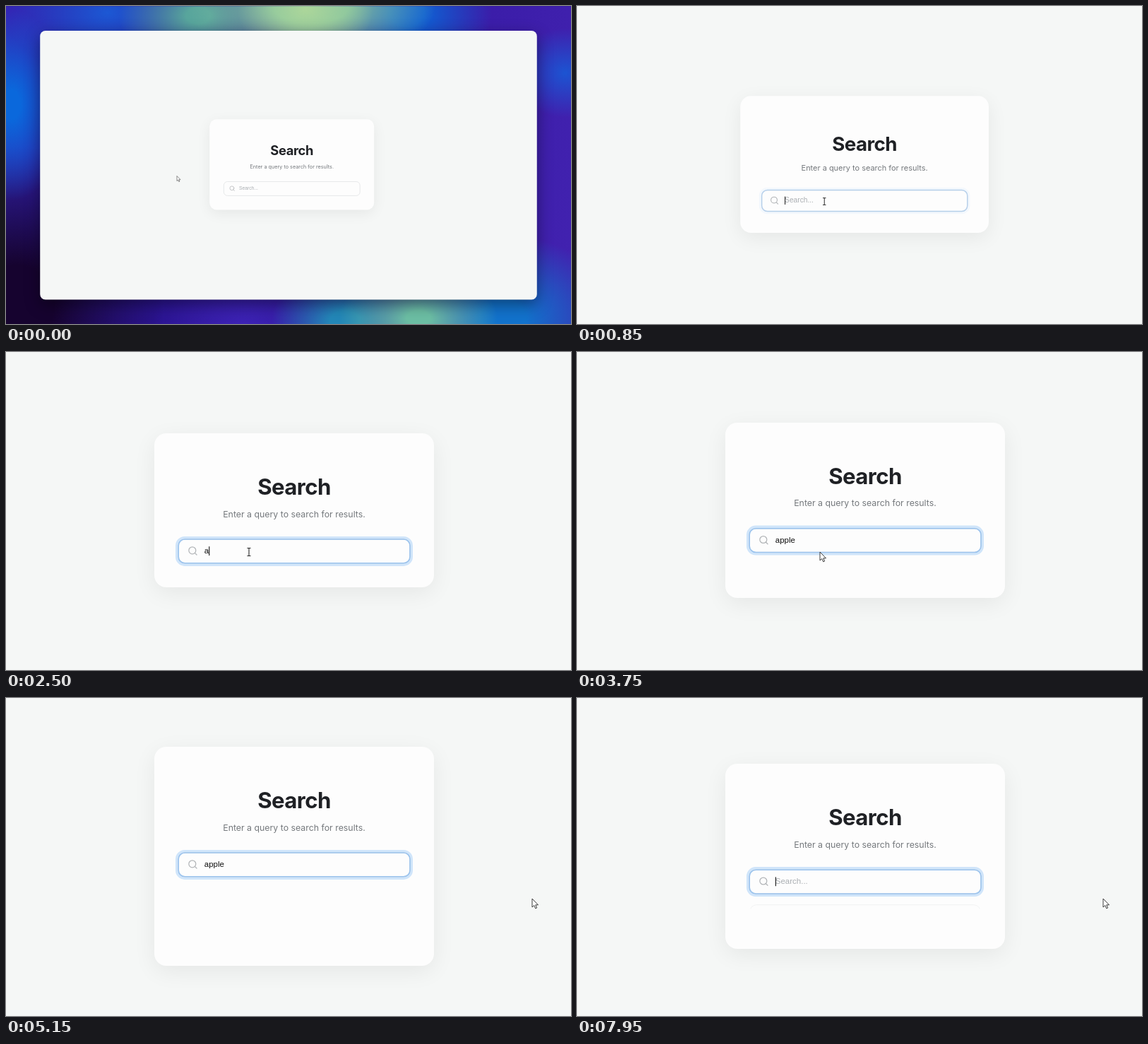
Animation of 800 by 450 pixels, one loop 8000 ms. Source, as an HTML page:

```html
<!DOCTYPE html>
<html lang="en">
<head>
<meta charset="utf-8">
<title>Search card</title>
<style>
  html, body { margin: 0; width: 100%; height: 100%; overflow: hidden; background: #2a1390; }
  #stage { position: relative; width: 800px; height: 450px; overflow: hidden; }
  #scene { position: absolute; inset: 0; transform-origin: 400px 225px; }
  #scene > * { position: absolute; }
  #wall {
    left: -280px; top: -157.5px; width: 1360px; height: 765px;
    background:
      radial-gradient(12% 16% at 53% 1%, #acd69a, transparent),
      radial-gradient(22% 18% at 54% 0%, #7fc0a0 30%, transparent),
      radial-gradient(14% 17% at 34% 3%, #58a59c 15%, transparent),
      radial-gradient(15% 22% at 71% 2%, #0f60d4 20%, transparent),
      radial-gradient(18% 20% at 18% 2%, #1c58d4, transparent),
      radial-gradient(10% 30% at 1% 31%, #0a68dc 15%, transparent),
      radial-gradient(9% 14% at 99% 21%, #1c54d2, transparent),
      radial-gradient(14% 15% at 73% 98%, #6cbea4 15%, transparent),
      radial-gradient(13% 16% at 60% 99%, #2387b8 20%, transparent),
      radial-gradient(20% 26% at 88% 98%, #1272cc 20%, transparent),
      radial-gradient(26% 50% at 2% 94%, #16032f 25%, transparent),
      radial-gradient(16% 22% at 42% 100%, #3c22b4, transparent),
      linear-gradient(100deg, #3424b4, #2a1390 35%, #3a1ca8 75%, #4222b0);
  }
  #window {
    left: -198.4px; top: -98px; width: 1196.8px; height: 647px;
    border-radius: 13px; background: #f5f7f6;
    box-shadow: 0 12px 36px rgba(0, 0, 0, .4);
  }
  #card {
    left: 209.5px; width: 396.5px; border-radius: 17px; background: #fdfdfd;
    box-shadow: 0 8px 32px rgba(0, 0, 0, .065);
  }
  svg { left: 0; top: 0; overflow: visible; }
  .title { font: 700 31.2px Inter, sans-serif; letter-spacing: -.02em; fill: #1f2125; }
  .sub { font: 400 12.34px Inter, sans-serif; fill: #75797d; }
  .field { font: 400 11.5px "Liberation Sans", Arial, sans-serif; white-space: pre; }
</style>
</head>
<body>
<div id="stage">
  <div id="scene">
    <div id="wall"></div>
    <div id="window"></div>
    <div id="card"></div>
    <svg width="800" height="450" fill="none">
      <defs>
        <clipPath id="clip"><rect id="reveal" x="240" y="313" width="336" height="0"/></clipPath>
      </defs>
      <g id="content">
        <text class="title" x="408" y="202" text-anchor="middle">Search</text>
        <text class="sub" x="408" y="233.8" text-anchor="middle">Enter a query to search for results.</text>
        <rect id="ring" x="242" y="262.9" width="332" height="38" rx="11" stroke="#d0e5fa" stroke-width="4"/>
        <rect x="244.2" y="265" width="327.8" height="33.8" rx="9" fill="#fdfdfd" stroke="#e2e4e6" stroke-width="1.4"/>
        <rect id="focus" x="244.2" y="265" width="327.8" height="33.8" rx="9" stroke="#9ac3ee" stroke-width="1.6"/>
        <g transform="translate(257 274) scale(.62)" stroke="#b1b4b7" stroke-width="2" stroke-linecap="round">
          <circle cx="11" cy="11" r="8"/>
          <path d="M21 21L16.65 16.65"/>
        </g>
        <text class="field" id="hint" x="280.8" y="285.2" fill="#abafb3">Search...</text>
        <text class="field" id="query" x="280.8" y="285.2" fill="#111"></text>
        <rect id="caret" y="275.2" width="1.1" height="12.8" fill="#111"/>
        <g clip-path="url(#clip)">
          <rect id="panel" x="244.5" y="314.5" width="327" height="76" rx="10" stroke="#e9ebeb"/>
        </g>
      </g>
      <g id="cursor">
        <path id="arrow" d="M0 0V12L2.8 9.5L4.7 13.8L6.6 13L4.8 8.8H8.5Z" fill="#fff" stroke="#333" stroke-width=".95" stroke-linejoin="round"/>
        <path id="beam" d="M-2.5-5.5h5M0-5.5v11M-2.5 5.5h5" stroke="#2a2a2a" stroke-width="1.1"/>
      </g>
    </svg>
  </div>
</div>
<script>
const LOOP = 8000;
const ZOOM_OUT = 1 / 1.7;
const FOCUS_AT = 740;
const GROW_AT = 3740;

// [time, text in the field]
const EDITS = [
  [FOCUS_AT, ""], [2495, "a"], [2695, "ap"], [2845, "app"], [2945, "appl"], [3195, "apple"],
  [6900, "appl"], [7050, "app"], [7200, "ap"], [7350, "a"], [7500, ""]
];

const el = Object.fromEntries([...document.querySelectorAll("[id]")].map(n => [n.id, n]));
const mix = (a, b, p) => a + (b - a) * p;
const span = (t, from, to) => Math.min(1, Math.max(0, (t - from) / (to - from)));
const inOut = p => p < .5 ? 4 * p ** 3 : 1 - 4 * (1 - p) ** 3;
const out = p => 1 - (1 - p) ** 3;
const show = (node, on) => node.setAttribute("visibility", on ? "visible" : "hidden");

// critically damped spring
function zoom(t) {
  const x = 5 * Math.max(0, t - 335) / 1000;
  return mix(ZOOM_OUT, 1, 1 - (1 + x) * Math.exp(-x));
}

// extra card height for the results area
function growth(t) {
  if (t < GROW_AT) return 0;
  if (t < 4650) return mix(30, 120, out(span(t, 3750, 4200)));
  if (t < 7600) return mix(120, 92, inOut(span(t, 4650, 5080)));
  return mix(92, 0, inOut(span(t, 7600, 8290)));
}

function drawCard(t) {
  const h = growth(t);
  el.card.style.top = 115 - h / 2 + "px";
  el.card.style.height = 218 + h + "px";
  el.content.setAttribute("transform", `translate(0 ${-h / 2})`);
  el.reveal.setAttribute("height", Math.max(0, 6 + (h - 43) * 1.5));
  el.panel.setAttribute("opacity", span(t, 5450, 5850) * mix(1, .6, span(t, 7500, 7950)));
}

function drawField(t) {
  const focus = out(span(t, FOCUS_AT, 1150));
  el.focus.setAttribute("opacity", focus);
  el.ring.setAttribute("opacity", focus ** 3);

  const edit = EDITS.filter(e => e[0] <= t).pop();
  const text = edit ? edit[1] : "";
  el.query.textContent = text;
  show(el.hint, !text);
  el.caret.setAttribute("x", 280.8 + (text ? el.query.getComputedTextLength() : 0));
  show(el.caret, edit && (t - edit[0]) % 1000 < 500);
}

function drawCursor(t) {
  const enter = inOut(span(t, 0, 550));
  const leave = inOut(span(t, 4620, 5080));
  const x = mix(mix(131.4, 344, enter), 745, leave);
  const y = mix(mix(251.4, 283, enter), 284, leave);
  const typing = x > 244 && t < GROW_AT;
  el.cursor.setAttribute("transform", `translate(${x} ${y})`);
  show(el.beam, typing);
  show(el.arrow, !typing);
}

function draw(now) {
  const t = now % LOOP;
  el.scene.style.transform = `scale(${zoom(t)})`;
  drawCard(t);
  drawField(t);
  drawCursor(t);
}

const start = performance.now();
function tick() {
  draw(performance.now() - start);
  requestAnimationFrame(tick);
}
tick();
</script>
</body>
</html>
```
